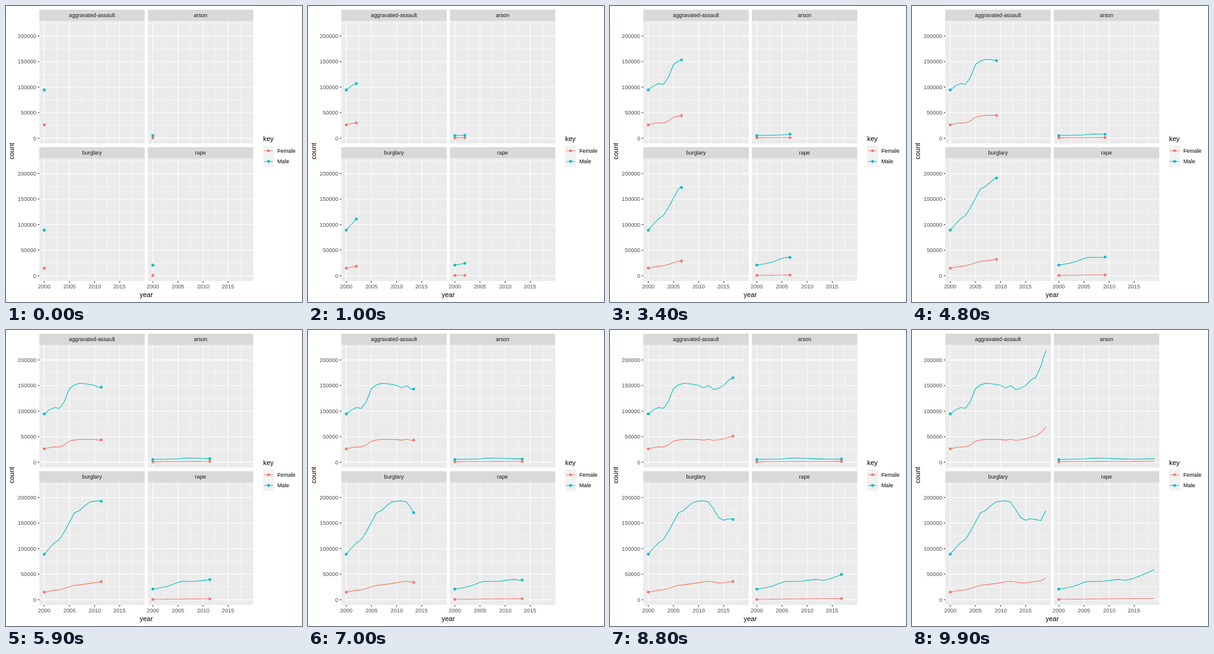
Recreate the animation shown at these times as an HTML page. Size 480x480 px, loop 10000 ms.

```html
<!DOCTYPE html>
<html lang="en">
<head>
<meta charset="utf-8">
<title>Counts by year</title>
<style>
html, body { margin: 0; width: 100%; height: 100%; overflow: hidden; background: #fff; }
svg { display: block; width: 480px; height: 480px; font: 9px "Liberation Sans", Arial, sans-serif; }
.word { font-size: 8.8px; }
.title { font-size: 11px; }
</style>
</head>
<body>
<svg id="chart" viewBox="0 0 480 480"></svg>
<script>
const FEMALE = '#F8766D', MALE = '#00BFC4';
const YEARS = 19, STEPS = 99, STEP_MS = 100;
const svg = document.getElementById('chart');

function add(tag, attrs, text) {
  const el = document.createElementNS('http://www.w3.org/2000/svg', tag);
  for (const name in attrs) el.setAttribute(name, attrs[name]);
  if (text) el.textContent = text;
  return svg.appendChild(el);
}
const rect = (x, y, width, height, fill) => add('rect', { x, y, width, height, fill });
const line = (x1, y1, x2, y2, stroke, w = 1.07) =>
  add('line', { x1, y1, x2, y2, stroke, 'stroke-width': w });
const dot = (cx, cy, fill) => add('circle', { cx, cy, r: 2.31, fill });
const label = (text, x, y, fill, anchor = 'middle', more = {}) =>
  add('text', { x, y, fill, 'text-anchor': anchor, ...more }, text);

// Monotone cubic curve through [year, value] points.
function curve(points) {
  const slope = points.slice(1).map(([x, y], i) => (y - points[i][1]) / (x - points[i][0]));
  const tangent = points.map((_, i) => {
    const a = slope[i - 1] ?? slope[i], b = slope[i] ?? a;
    return a * b > 0 ? 2 * a * b / (a + b) : 0;
  });
  return k => {
    const i = Math.max(0, points.findIndex(([x]) => x >= k) - 1);
    const [x, y] = points[i], [x2, y2] = points[i + 1];
    const h = x2 - x, t = (k - x) / h, u = 1 - t;
    return y * u * u * (1 + 2 * t) + y2 * t * t * (1 + 2 * u)
      + h * t * u * (tangent[i] * u - tangent[i + 1] * t);
  };
}

// Counts in thousands over years since 2000; the female count follows from the male one or the year.
const panels = [
  { name: 'aggravated-assault', col: 0, row: 0,
    male: curve([[0, 94.4], [2, 107], [3, 105.4], [4, 119], [5, 144], [7, 154.2], [10, 150.3],
      [11, 145.4], [12, 150], [13, 142], [15, 150.5], [16, 160.7], [17, 166], [19, 218.3]]),
    female: (k, male) => male * (0.276 + 0.0019 * k) },
  { name: 'arson', col: 1, row: 0,
    male: curve([[0, 5.3], [5, 6.5], [7, 8.2], [11, 7], [15, 6], [19, 7]]),
    female: k => 0.9 + 0.04 * k },
  { name: 'burglary', col: 0, row: 1,
    male: curve([[0, 89], [2, 111], [3, 118], [5, 152], [6, 170], [7, 174.5], [9, 191],
      [11, 193.4], [12, 191], [14, 160.5], [15, 155.5], [16, 158.4], [18, 155], [19, 174.5]]),
    female: (k, male) => male * (0.166 + 0.0078 * Math.max(0, k - 9)) },
  { name: 'rape', col: 1, row: 1,
    male: curve([[0, 20.8], [3, 26.4], [6, 36], [8, 35.7], [12, 39.8], [13, 37.8], [15, 42.5], [19, 59]]),
    female: k => 0.6 + 0.1 * k }
];

const series = [];
for (const p of panels) {
  const dx = p.col * 176, dy = p.row * 223;
  const px = k => 62.1 + dx + k * 8.154;
  const py = v => 214.4 + dy - v * 0.829;
  const left = 54 + dx, top = 24 + dy, right = left + 171, bottom = top + 199;

  rect(left, top - 18, 171, 18, '#D9D9D9');
  rect(left, top, 171, 199, '#EBEBEB');
  label(p.name, left + 85.4, top - 6, '#1A1A1A', 'middle', { class: 'word' });

  const gridX = (k, w) => line(px(k), top, px(k), bottom, '#fff', w);
  const gridY = (v, w) => line(left, py(v), right, py(v), '#fff', w);
  for (let v = 25; v <= 225; v += 50) gridY(v, 0.53);
  for (let k = 2.5; k < YEARS; k += 5) gridX(k, 0.53);
  for (let v = 0; v <= 200; v += 50) {
    gridY(v);
    if (p.col) continue;
    line(51.5, py(v), 54.2, py(v), '#333');
    label(String(v * 1000), 49, Math.round(py(v) + 3.2), '#4D4D4D', 'end');
  }
  for (let k = 0; k < YEARS; k += 5) {
    gridX(k);
    if (!p.row) continue;
    line(px(k), 446, px(k), 448.7, '#333');
    label(String(2000 + k), Math.round(px(k)), 458, '#4D4D4D');
  }

  const years = Array.from({ length: YEARS + 1 }, (_, k) => k);
  const male = years.map(p.male), female = years.map(k => p.female(k, male[k]));
  const group = [[female, FEMALE], [male, MALE]].map(([data, color]) => ({
    data, px, py, color,
    path: add('polyline', { fill: 'none', stroke: color, 'stroke-width': 1.07, 'stroke-linejoin': 'round' })
  }));
  for (const s of group) {
    dot(px(0), py(s.data[0]), s.color);
    s.head = dot(px(0), py(s.data[0]), s.color);
    series.push(s);
  }
}

label('year', 227.4, 471.5, '#000', 'middle', { class: 'title' });
label('count', 0, 0, '#000', 'middle', { class: 'title', transform: 'translate(13 235.3) rotate(-90)' });
label('key', 417, 219, '#000', 'start', { class: 'title' });
rect(417, 226, 18, 35, '#F2F2F2');
[['Female', FEMALE, 234.8], ['Male', MALE, 252.1]].forEach(([text, color, y]) => {
  line(418.9, y, 432.7, y, color);
  dot(425.8, y, color);
  label(text, 440, Math.round(y + 3), '#000', 'start', { class: 'word' });
});

// Each year is reached on a whole step; the heads move linearly in between.
const stepOf = k => Math.round(k * STEPS / YEARS);

function draw(step) {
  let k = 0;
  while (k < YEARS - 1 && stepOf(k + 1) <= step) k++;
  const f = (step - stepOf(k)) / (stepOf(k + 1) - stepOf(k));
  for (const { data, px, py, path, head } of series) {
    const x = px(k + f), y = py(data[k] + (data[k + 1] - data[k]) * f);
    const points = data.slice(0, k + 1).map((v, n) => [px(n), py(v)]);
    path.setAttribute('points', [...points, [x, y]].join(' '));
    head.setAttribute('cx', x);
    head.setAttribute('cy', y);
    head.setAttribute('visibility', step < STEPS ? 'visible' : 'hidden');
  }
}

const start = performance.now();
function tick() {
  draw(Math.floor((performance.now() - start) / STEP_MS) % (STEPS + 1));
  requestAnimationFrame(tick);
}
tick();
</script>
</body>
</html>
```
